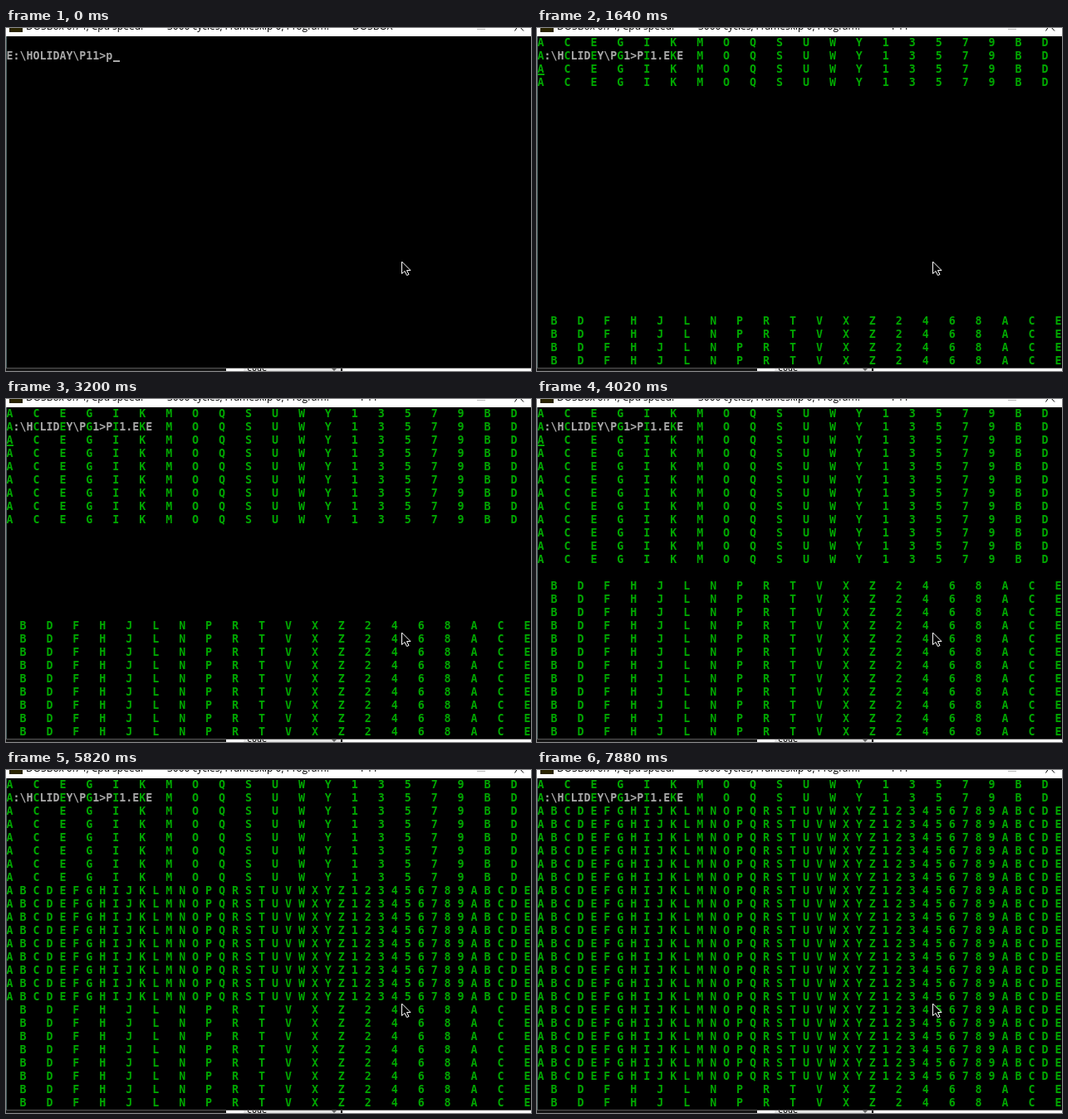
Recreate the animation shown at these times as an HTML page. Size 632 by 414 pixels, loop 8000 ms.

```html
<!DOCTYPE html>
<html lang="en">
<head>
<meta charset="utf-8">
<title>Letters in a DOS window</title>
<style>
html, body { margin: 0; width: 100%; height: 100%; overflow: hidden; background: #000; }
#stage { position: relative; width: 632px; height: 414px; overflow: hidden; background: #000; }
#stage > * { position: absolute; margin: 0; }
svg { left: 0; top: 0; }
pre {
  left: .5px; font: bold 13.288px/16px "DejaVu Sans Mono", monospace;
  color: #00a800; white-space: pre;
}
#command { top: 26px; color: #a8a8a8; }
#top { top: 10px; }
#bottom { bottom: 4px; }
#cursor { width: 8px; height: 2px; }
.bar { font: 12px "Open Sans", sans-serif; fill: #000; white-space: pre; }
</style>
</head>
<body>
<div id="stage">
  <pre id="command"></pre>
  <pre id="top"></pre>
  <pre id="bottom"></pre>
  <div id="cursor"></div>
  <svg width="632" height="414" viewBox="0 0 632 414">
    <path fill="#fff" d="M0 0H632V10H0z"/>
    <path fill="#2a2400" d="M4 0H20V5H4z"/>
    <g class="bar">
      <text x="24" y="2">DOSBox 0.74, Cpu speed:</text>
      <text x="194" y="2">3000 cycles, Frameskip  0, Program:</text>
      <text id="program" y="2"></text>
    </g>
    <path fill="none" stroke="#bbb" d="M567 1.5H577"/>
    <path fill="none" stroke="#000" d="M616 -2L612.5 3.5M618 -2L623 3.5"/>
    <path fill="#4c6464" d="M0 10H1V410H0z"/>
    <path fill="#555" d="M0 410H632V411H0z"/>
    <path fill="#161616" d="M0 411H265V414H0z"/>
    <path fill="#fff" d="M265 411H632V414H265z"/>
    <path fill="#e4e4e4" d="M286 411H403V414H286z"/>
    <path fill="#000" d="M403 411H405V414H403z"/>
    <path fill="#666" d="M392 411H398L395 414z"/>
    <svg y="411" width="632" height="3">
      <text x="290" y="3" font-family="DejaVu Sans Mono, monospace" font-size="10">code</text>
    </svg>
    <path fill="#000" stroke="#fff" d="M476.5 282V296.5L480 293.5L482.5 298.5L485 297.5L482.5 292.5H487z"/>
  </svg>
</div>
<script>
const LOOP = 8000;
const $ = id => document.getElementById(id);

// Screen refreshes: [first, last, count], evenly spaced
const bursts = [
  [0, 120, 2], [280, 280, 1], [550, 940, 4], [1240, 2060, 7], [2370, 3350, 8],
  [3470, 3710, 3], [4020, 4840, 7], [5090, 5240, 2], [5370, 5510, 2], [5820, 5820, 1],
  [6130, 6390, 3], [6700, 6850, 2], [7100, 7610, 5], [7760, 7880, 2]
];
const ticks = bursts.flatMap(([a, b, n]) =>
  Array.from({ length: n }, (_, i) => Math.round(a + (b - a) * i / Math.max(1, n - 1))));

const letters = "ABCDEFGHIJKLMNOPQRSTUVWXYZ123456789ABCDE";
const line = odd => [...letters].map((c, i) => (i % 2 === odd ? c : " ")).join(" ");
const fill = (odd, n) => Array(n).fill(line(odd)).join("\n");

const prompt = "E:\\HOLIDAY\\P11>";
const typed = prompt + "P11.EXE";
const covered = [...typed].map((c, i) => (i % 4 ? c : " ")).join("");

function draw(t) {
  const rows = t < 230 ? 0 : 1 + Math.floor((t - 230) / 340);
  const running = rows > 0;
  const command = t < 120 ? prompt + "p" : rows < 2 ? typed : covered;

  $("command").textContent = command;
  $("top").textContent = fill(0, rows);
  $("bottom").textContent = fill(1, rows);
  $("program").textContent = running ? "P11" : "DOSBOX";
  $("program").setAttribute("x", running ? 427 : 417);

  const cursor = $("cursor").style;
  const col = running ? 0 : command.length;
  const row = running ? 2 : 1;
  cursor.left = 1 + col * 8 + "px";
  cursor.top = 23 + row * 16 + "px";
  cursor.background = rows > 2 ? "#00a800" : "#a8a8a8";
  cursor.visibility = (t + 90) % 500 < 250 ? "visible" : "hidden";
}

const start = performance.now();
let shown = -1;
function frame() {
  const t = (performance.now() - start) % LOOP;
  const tick = ticks.filter(k => k <= t).pop();
  if (tick !== shown) draw(shown = tick);
  requestAnimationFrame(frame);
}
frame();
</script>
</body>
</html>
```
